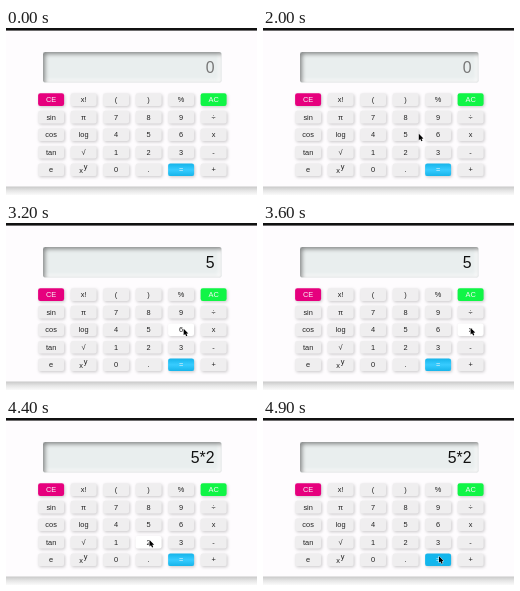
Write an HTML page with a canvas that moves like this. It is 251x167 px and loops after 5000 ms.

```html
<!DOCTYPE html>
<html lang="en">
<head>
<meta charset="utf-8">
<title>Calculator</title>
<style>
  html, body { margin: 0; width: 100%; height: 100%; overflow: hidden; background: #fff; }
  canvas { display: block; width: 251px; height: 167px; }
</style>
</head>
<body>
<canvas id="stage"></canvas>
<script>
const W = 251, H = 167, LOOP = 5000, STEP = 100;
const FONT = '"Liberation Sans", Arial, sans-serif';
const canvas = document.getElementById('stage');
const ctx = canvas.getContext('2d');
const scale = window.devicePixelRatio || 1;
canvas.width = Math.round(W * scale);
canvas.height = Math.round(H * scale);

const KEYS = [
  ['CE', 'x!', '(', ')', '%', 'AC'],
  ['sin', 'π', '7', '8', '9', '÷'],
  ['cos', 'log', '4', '5', '6', 'x'],
  ['tan', '√', '1', '2', '3', '-'],
  ['e', 'xy', '0', '.', '=', '+']
];
const KEY_W = 26, KEY_H = 12.6;
const keyX = col => 32.1 + col * 32.5;
const keyY = row => 65.3 + row * 17.55;

// Pointer stops: time, x, y
const PATH = [
  [1600, 216, 138],
  [2000, 155.8, 105.8],
  [2300, 148.8, 106],
  [3000, 148.8, 106],
  [3400, 206.5, 105.5],
  [3500, 206.5, 105.5],
  [3600, 207.6, 104.9],
  [3700, 207.6, 104.9],
  [4300, 143.5, 122],
  [4400, 143.5, 122],
  [4900, 176, 138.3]
];

function pointerAt(t) {
  if (t < 1700) return null;
  const next = PATH.findIndex(stop => t <= stop[0]);
  const [t0, x0, y0] = PATH[next - 1], [t1, x1, y1] = PATH[next];
  const p = (t - t0) / (t1 - t0);
  const e = p * p * (3 - 2 * p);
  return { x: x0 + (x1 - x0) * e, y: y0 + (y1 - y0) * e };
}

function displayAt(t) {
  if (t < 2700) return '0';
  if (t < 3800) return '5';
  return t < 4400 ? '5*' : '5*2';
}

function shadow(color, blur, dx, dy) {
  ctx.shadowColor = color;
  ctx.shadowBlur = blur * scale;
  ctx.shadowOffsetX = dx * scale;
  ctx.shadowOffsetY = dy * scale;
}

function gradient(y0, y1, ...colors) {
  const g = ctx.createLinearGradient(0, y0, 0, y1);
  colors.forEach((c, i) => g.addColorStop(i / (colors.length - 1), c));
  return g;
}

function text(str, x, y, size, color, align = 'center') {
  ctx.font = `${size}px ${FONT}`;
  ctx.textAlign = align;
  ctx.fillStyle = color;
  ctx.fillText(str, x, y);
}

function drawCard() {
  ctx.fillStyle = '#fefcfe';
  ctx.fillRect(0, 0, W, H);
  ctx.fillStyle = gradient(158.5, H, '#c8c8c8', '#e6e6e6', '#fafafa');
  ctx.fillRect(0, 158.5, W, H - 158.5);
  ctx.fillStyle = '#111';
  ctx.fillRect(0, 0, W, 2.6);
}

function drawDisplay(value) {
  const x = 37, y = 24, w = 178.5, h = 30.5;
  // A ring outside the clip casts the inset shadow
  const inset = (...args) => {
    shadow(...args);
    ctx.beginPath();
    ctx.rect(x - 20, y - 20, w + 40, h + 40);
    ctx.roundRect(x, y, w, h, 2);
    ctx.fill('evenodd');
  };
  ctx.save();
  ctx.beginPath();
  ctx.roundRect(x, y, w, h, 2);
  ctx.clip();
  ctx.fillStyle = '#e9eeee';
  ctx.fillRect(x, y, w, h);
  inset('#fff', 4, -2, -2);
  inset('rgba(50,50,50,.55)', 4, 2, 2);
  ctx.restore();
  text(value, 208.5, 44.8, 15.8, value === '0' ? '#777' : '#111', 'right');
}

function keyFill(label, y, hover) {
  if (label === 'CE') return '#e6007e';
  if (label === 'AC') return '#10f546';
  if (label === '=') return gradient(y, y + KEY_H, '#16b4ea', hover ? '#10b8ee' : '#38ccff', '#16b4ea');
  return hover ? '#fff' : '#efeeef';
}

function drawKey(label, x, y, pointer) {
  const hover = pointer && pointer.x > x && pointer.x < x + KEY_W &&
    pointer.y > y - 2 && pointer.y < y + KEY_H;
  const colored = ['CE', 'AC', '='].includes(label);
  ctx.save();
  ctx.filter = `blur(${0.35 * scale}px)`;
  shadow('rgba(0,0,0,.2)', 3.5, 1, 1.2);
  ctx.beginPath();
  ctx.roundRect(x, y, KEY_W, KEY_H, 2.2);
  ctx.fillStyle = keyFill(label, y, hover);
  ctx.fill();
  ctx.restore();

  const cx = x + KEY_W / 2, base = y + 8.8;
  if (label === 'xy') {
    text('x', cx - 2.6, base + 0.2, 7.4, '#222');
    text('y', cx + 2.1, base - 3, 7.4, '#222');
  } else {
    text(label, cx, base, 7.4, colored ? '#f5f5f5' : '#222');
  }
}

function drawPointer({ x, y }) {
  ctx.save();
  ctx.translate(x, y);
  ctx.scale(0.82, 0.82);
  ctx.beginPath();
  [[0, 0], [0, 8], [1.8, 6.4], [3.1, 9.2], [4.5, 8.6], [3.3, 5.9], [5.7, 5.7]]
    .forEach(([px, py]) => ctx.lineTo(px, py));
  ctx.closePath();
  ctx.lineJoin = 'round';
  ctx.lineWidth = 1;
  ctx.strokeStyle = '#fff';
  ctx.stroke();
  ctx.fillStyle = '#000';
  ctx.fill();
  ctx.restore();
}

function render(now) {
  const t = Math.floor((now % LOOP) / STEP) * STEP;
  const pointer = pointerAt(t);
  ctx.setTransform(scale, 0, 0, scale, 0, 0);
  drawCard();
  drawDisplay(displayAt(t));
  KEYS.forEach((row, r) => row.forEach((label, c) =>
    drawKey(label, keyX(c), keyY(r), pointer)));
  if (pointer) drawPointer(pointer);
}

const start = performance.now();
function tick() {
  render(performance.now() - start);
  requestAnimationFrame(tick);
}
tick();
</script>
</body>
</html>
```
